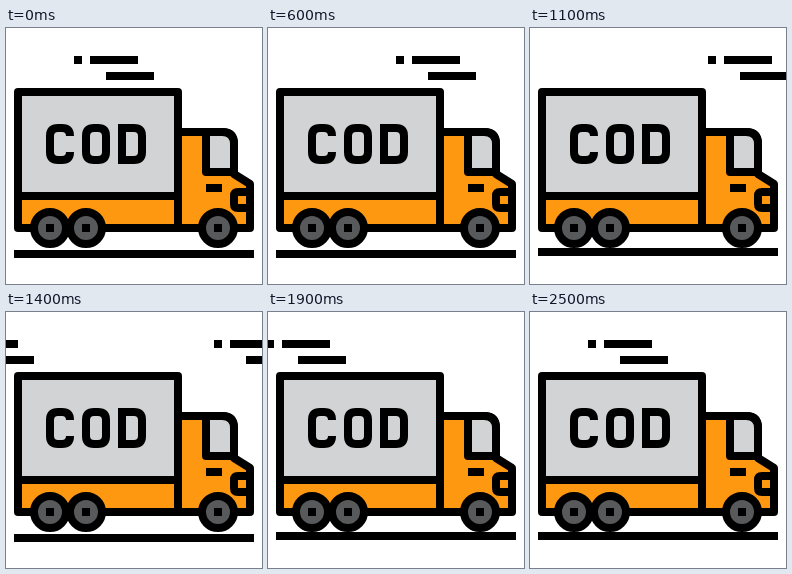
These frames come from a looping animation (256x256 px, 2600 ms). An HTML page with a canvas:

```html
<!DOCTYPE html>
<html lang="en">
<head>
<meta charset="utf-8">
<title>Delivery truck</title>
<style>
  html, body { margin: 0; width: 100%; height: 100%; overflow: hidden; background: #fff; }
  canvas { display: block; width: 256px; height: 256px; }
</style>
</head>
<body>
<canvas id="stage" width="256" height="256"></canvas>
<script>
const ctx = document.getElementById('stage').getContext('2d');
const ORANGE = '#ff9811', GREY = '#d1d3d4', TYRE = '#58595b', BLACK = '#000';
const STEP = 100, STEPS = 26, SHIFT = 10, WRAP = STEPS * SHIFT;

const cargo = new Path2D('M12 64H172V168H12Z');
const bed = new Path2D('M12 168H172V200H12Z');
const cab = new Path2D('M172 104H216Q228 104 228 116V146L244 156V200H172Z');
const glass = new Path2D('M200 104H216Q228 104 228 116V144H200Z');
const lamp = new Path2D('M244 164H232Q228 164 228 168V176Q228 180 232 180H244');
const letters = new Path2D(
  'M64 108Q64 100 56 100H52Q44 100 44 108V124Q44 132 52 132H56Q64 132 64 124' +
  'M88 100H92Q100 100 100 108V124Q100 132 92 132H88Q80 132 80 124V108Q80 100 88 100Z' +
  'M116 100H128Q136 100 136 108V124Q136 132 128 132H116Z');

function shape(path, fill) {
  if (fill) {
    ctx.fillStyle = fill;
    ctx.fill(path);
  }
  ctx.stroke(path);
}

function bar(x, y, w, h = 8) {
  ctx.fillStyle = BLACK;
  ctx.fillRect(x, y, w, h);
}

function wheel(x) {
  const rim = new Path2D();
  rim.arc(x, 200, 16, 0, Math.PI * 2);
  shape(rim, TYRE);
  bar(x - 4, 196, 8);
}

function truck() {
  ctx.strokeStyle = BLACK;
  ctx.lineWidth = 8;
  ctx.lineJoin = 'round';
  shape(cab, ORANGE);
  shape(glass, GREY);
  shape(bed, ORANGE);
  shape(cargo, GREY);
  shape(lamp);
  bar(200, 156, 16);
  ctx.lineJoin = 'miter';
  shape(letters);
  [44, 80, 212].forEach(wheel);
}

function windLine(x, y, w, offset) {
  const left = x + offset;
  bar(left, y, w);
  bar(left - WRAP, y, w);
}

function draw(time) {
  const step = Math.floor(time / STEP) % STEPS;
  const offset = step * SHIFT;
  ctx.fillStyle = '#fff';
  ctx.fillRect(0, 0, 256, 256);
  windLine(68, 28, 8, offset);
  windLine(84, 28, 48, offset);
  windLine(100, 44, 48, offset);
  truck();
  bar(8, step % 2 ? 220 : 222, 240);
}

let start;
function tick(now) {
  start ??= now;
  draw(now - start);
  requestAnimationFrame(tick);
}
requestAnimationFrame(tick);
</script>
</body>
</html>
```
